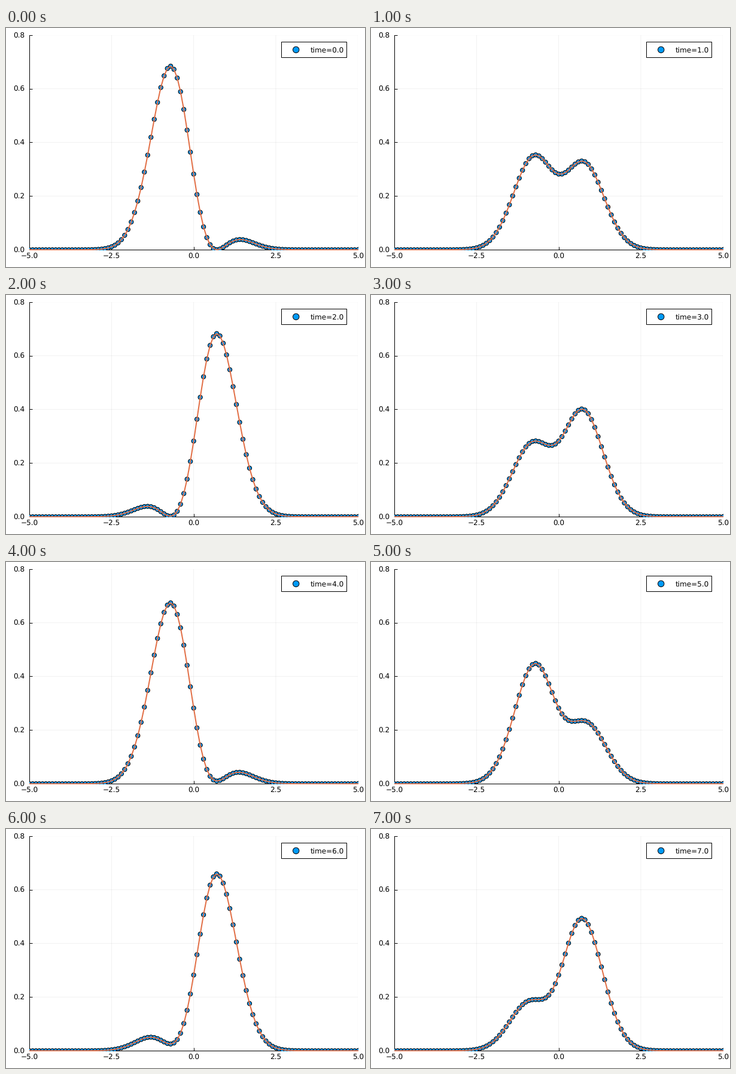
Animation of 600 by 400 pixels, one loop 8 s. Source, as a matplotlib script:

```python
import numpy as np
import matplotlib.pyplot as plt
from matplotlib.animation import FuncAnimation
from matplotlib.collections import EllipseCollection
from matplotlib.patches import Circle, Rectangle
from matplotlib.transforms import Affine2D, Bbox

W, H, DPI = 600, 400, 100
PX = 72 / DPI
BLUE, ORANGE = "#009af9", "#e26f46"
LEFT, RIGHT, TOP, BOTTOM = 39.1, 588.2, 11.8, 371.2
FONT = 12 * PX
OMEGA, PHASE = 1.5, 0.0375

plt.rcParams["font.family"] = "DejaVu Sans"
plt.rcParams["text.hinting"] = "none"
fig = plt.figure(figsize=(W / DPI, H / DPI), dpi=DPI, facecolor="white")
ax = fig.add_axes([LEFT / W, 1 - BOTTOM / H, (RIGHT - LEFT) / W, (BOTTOM - TOP) / H])
ax.set(xlim=(-5, 5), ylim=(0, 0.8))
ax.set_xticks(np.arange(-5, 5.1, 2.5))
ax.set_yticks(np.arange(0, 0.81, 0.2))
ax.xaxis.set_major_formatter("{x:.1f}")
ax.yaxis.set_major_formatter("{x:.1f}")
ax.set_axisbelow(True)
ax.grid(color="black", alpha=0.055, lw=PX, snap=False)
ax.tick_params(direction="in", length=5 * PX, width=PX, labelsize=FONT)
ax.tick_params(axis="x", pad=6 * PX)
ax.tick_params(axis="y", pad=8 * PX)
for side, spine in ax.spines.items():
    spine.set(visible=side in ("left", "bottom"), linewidth=PX, zorder=0.9)

# Top-left pixel coordinates for the legend
pixels = Affine2D().scale(1 / W, -1 / H).translate(0, 1) + fig.transFigure

x = np.linspace(-5, 5, 101)
dot_style = dict(facecolor=BLUE, edgecolor="black", linewidth=PX)
size = np.full(x.size, 7.2)
dots = EllipseCollection(size, size, 0 * size, units="dots",
                         offsets=np.column_stack([x, 0 * x]),
                         offset_transform=ax.transData, zorder=3, **dot_style)
dots.set_snap(False)
ax.add_collection(dots, autolim=False)
curve, = ax.plot(x, 0 * x, color=ORANGE, lw=2 * PX, zorder=4)

# Let the series cover the axis lines but nothing beyond them
plot_area = Bbox.from_extents(39, H - 372, 589, H - 12)
for artist in (dots, curve):
    artist.set_clip_box(plot_area)

fig.add_artist(Rectangle((460.2, 23.2), 109.2, 26, transform=pixels,
                         fc="white", ec="black", lw=PX, zorder=5))
fig.add_artist(Circle((484.7, 36.4), 5.2, transform=pixels, zorder=6, **dot_style))
label = fig.text(508.6, 40.4, "", transform=pixels, fontsize=FONT,
                 va="baseline", zorder=6)


def density(t):
    """Equal mix of the two lowest oscillator states."""
    beat = np.cos(OMEGA * t + PHASE)
    mix = 0.5 + x**2 - np.sqrt(2) * x * beat
    return np.exp(-x**2) / np.sqrt(np.pi) * mix


def update(t):
    y = density(t)
    dots.set_offsets(np.column_stack([x, y]))
    curve.set_ydata(y)
    label.set_text(f"time={t:.1f}")
    return dots, curve, label


anim = FuncAnimation(fig, update, frames=8, interval=1000, repeat=True,
                     repeat_delay=0, blit=False)
plt.show()
```
